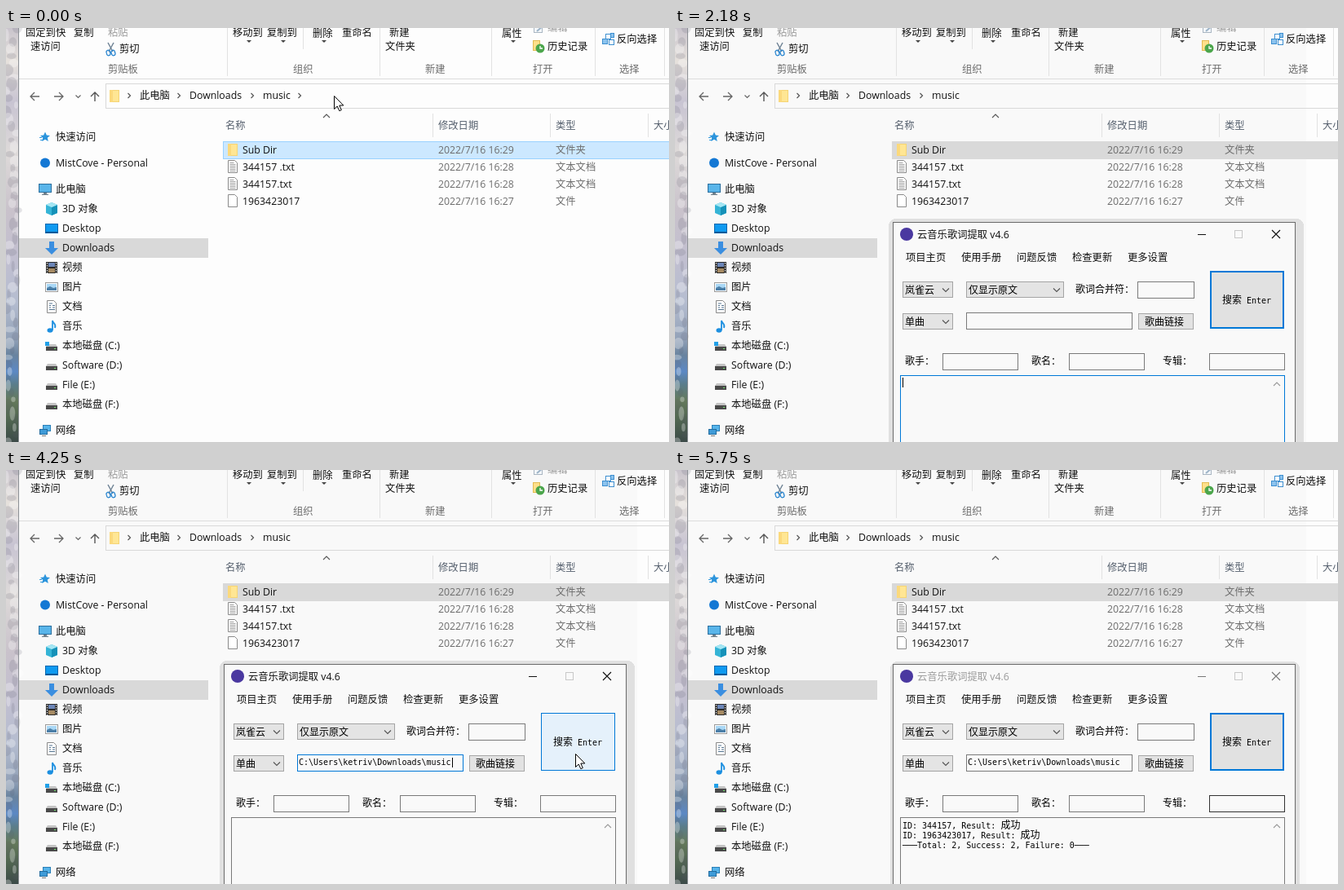
Recreate the animation shown at these times as an HTML page. Size 813x508 px, loop 5.77 s.

```html
<!DOCTYPE html>
<html lang="zh-CN">
<head>
<meta charset="utf-8">
<title>File window and lyric tool</title>
<style>
html, body { margin: 0; width: 100%; height: 100%; overflow: hidden; background: #fdfdfd; }
svg { display: block; width: 813px; height: 508px; }
text { font: 12.3px "Open Sans", "Noto Sans CJK SC", "Noto Sans CJK", sans-serif; fill: #111; white-space: pre; }
.dim { fill: #6d6d6d; }
.head { fill: #56606e; }
.off { fill: #9b9b9b; }
.white { fill: #fff; }
.form { font-size: 12px; fill: #000; }
.mono { font: 10px "DejaVu Sans Mono", monospace; }
rect { shape-rendering: crispEdges; }
</style>
</head>
<body>
<svg id="stage" viewBox="0 0 813 508"></svg>
<script>
const LOOP = 5770;
const BLUE = '#0078d7';
const PAPER = '#fdfdfd', SHADE = '#f9f9f9';
const PATH = 'C:\\Users\\ketriv\\Downloads\\music';

// Drawing helpers: each returns SVG markup
const rect = (x, y, w, h, fill, stroke, sw = 1) => stroke
  ? `<rect x="${x + sw / 2}" y="${y + sw / 2}" width="${w - sw}" height="${h - sw}" fill="${fill}" stroke="${stroke}" stroke-width="${sw}"/>`
  : `<rect x="${x}" y="${y}" width="${w}" height="${h}" fill="${fill}"/>`;
const path = (d, stroke, sw = 1, fill = 'none') =>
  `<path d="${d}" fill="${fill}" stroke="${stroke}" stroke-width="${sw}"/>`;
const disc = (x, y, r, fill) => `<circle cx="${x}" cy="${y}" r="${r}" fill="${fill}"/>`;
const text = (x, mid, str, cls = '') => `<text x="${x}" y="${Math.round(mid + 4.6)}" class="${cls}">${str}</text>`;
const form = (x, mid, str) =>
  text(x, mid - .3, str.replace(/[ -~─]+/g, '<tspan class="mono">$&</tspan>'), 'form');
const move = (x, y, body) => `<g transform="translate(${x} ${y})">${body}</g>`;
const during = (spans, body) => `<g data-on="${spans}">${body}</g>`;
const vline = (x, y, h, color = '#e2e2e2') => rect(x, y, 1, h, color);
const chevron = (x, y, dx, dy, color = '#555') => dx
  ? path(`M${x - 1.5} ${y - 3}l3 3l-3 3`, color, 1.2)
  : path(`M${x - 4} ${y - dy * 2}l4 ${dy * 4}l4 ${-dy * 4}`, color, 1.1);
const dropMark = x => path(`M${x - 3} 15h6l-3 3z`, 'none', 0, '#444');

// Icons, centred on the origin
const folder = rect(-6, -7, 12, 15, '#ffe694', '#f5d475') + rect(-6, -7, 4, 15, '#fbd97c');
const sheet = path('M-5.5 -7.5h8l3 3v12h-11z', '#8a8a8a', 1, '#fff');
const textFile = sheet + path('M-3.5 -4.5h5M-3.5 -2.5h7M-3.5 -.5h7M-3.5 1.5h7M-3.5 3.5h7M-3.5 5.5h7', '#8a8a8a', .8);
const drive = path('M-7 0l2 -3h10l2 3z', 'none', 0, '#c4c4c4') + rect(-7, 0, 14, 5, '#4a4a4a') + rect(3, 2, 2, 1, '#6fe06a');
const screen = rect(-8, -7, 16, 11, '#59b5ea', '#2c6f9e') + rect(-2, 4, 4, 2, '#71818c') + rect(-4, 6, 8, 1, '#71818c');
const star = path('M0 -6L1.8 -2L6 -1.6L2.8 1.2L3.8 5.5L0 3.2L-3.8 5.5L-2.8 1.2L-6 -1.6L-1.8 -2z', 'none', 0, '#2b94dc') + path('M-7 1h3M-6 4h3', '#2b94dc');
const cube = path('M0 -8L7 -5V5L0 8L-7 5V-5z', 'none', 0, '#35b4d6') + path('M0 -2L7 -5V5L0 8z', 'none', 0, '#1591b8') + path('M0 -8L7 -5L0 -2L-7 -5z', 'none', 0, '#a5e6f3');
const desk = rect(-8, -6, 16, 12, '#0f9af0', '#0865ad') + rect(-7, 4, 14, 1, '#0a4f86');
const down = path('M-3 -8H3V0H8L0 8L-8 0H-3z', 'none', 0, '#3a8ee0');
const film = rect(-7, -7, 14, 14, '#2b2b2b') + rect(-4, -6, 8, 5, '#6c86b8') + rect(-4, 1, 8, 5, '#a58a63')
  + path('M-5.5 -6v13M5.5 -6v13', '#eee', 1.2).replace('<path', '<path stroke-dasharray="1.5 1.5"');
const picture = rect(-8, -6, 16, 12, '#fff', '#9a9a9a') + rect(-6, -4, 12, 8, '#a9d7f5') + path('M-6 4v-3l4 -2l4 2l4 -1v4z', 'none', 0, '#4b7fa8');
const doc = sheet + path('M-3 -4h4M-3 -1.5h2M1 -1.5h3M-3 1h2M1 1h3M-3 3.5h7', '#53738f', 1.2);
const note = `<ellipse cx="-2" cy="5" rx="3.5" ry="2.8" fill="#1c8fe0"/>` + path('M1 5V-7C2 -3 6 -3 4 2', '#1c8fe0', 1.8);
const net = rect(-3, -7, 10, 8, '#56b4ea', '#2a7fb8') + rect(-7, -2, 10, 7, '#3f9bd8', '#226c9e') + rect(-4, 6, 5, 1, '#777');

const arrowCursor = '<path d="M.5 .5V16.5L4.2 13L6.8 18.7L9.3 17.6L6.8 12H11.8z" fill="#fff" stroke="#000"/>';
const beamCursor = path('M-3 -8h2l1 1l1 -1h2M0 -7v14M-3 8h2l1 -1l1 1h2', '#222');

function wallpaper() {
  const stops = [[0, '#c9c4cc'], [8, '#e6e1dc'], [18, '#c8c4d2'], [30, '#dedad9'], [44, '#c9c2cb'],
    [55, '#c2bfd0'], [66, '#b5bdd0'], [75, '#93a2b8'], [79, '#69839f'], [83, '#5c88c4'], [86, '#5b7d8c'],
    [90, '#64795b'], [95, '#4f6450'], [100, '#3c4a48']];
  const rand = n => Math.abs(Math.sin(n * 12.9898) * 43758.5453) % 1;
  const blots = Array.from({ length: 60 }, (_, i) =>
    `<ellipse cx="${rand(i + 1) * 15}" cy="${i * 8.6}" rx="${2 + rand(i + 90) * 5}" ry="${3 + rand(i + 200) * 6}"`
    + ` fill="${i % 2 ? '#fff' : '#545a68'}" opacity="${i % 2 ? .3 : .16}"/>`).join('');
  return `<defs><linearGradient id="sky" x2="0" y2="1">${stops.map(([p, c]) =>
    `<stop offset="${p}%" stop-color="${c}"/>`).join('')}</linearGradient></defs>`
    + rect(0, 0, 16, 508, 'url(#sky)') + blots + vline(15, 0, 508, '#8d9196');
}

function ribbon() {
  const labels = [[24, 5, '固定到快'], [30, 22, '速访问'], [83, 5, '复制'], [125, 5, '粘贴', 'off'], [139, 25, '剪切'],
    [278, 5, '移动到'], [320, 5, '复制到'], [376, 6, '删除'], [412, 5, '重命名'], [470, 5, '新建'], [465, 22, '文件夹'],
    [608, 6, '属性'], [664, -1, '编辑', 'off'], [664, 22, '历史记录'], [749, 13, '反向选择'],
    [125, 50, '剪贴板', 'dim'], [352, 50, '组织', 'dim'], [514, 50, '新建', 'dim'], [646, 50, '打开', 'dim'], [752, 50, '选择', 'dim']];
  const scissors = path('M125 18L131 29M132 18L126 29', '#6b7f92', 1.4)
    + path('M123.5 31a2.3 2.3 0 1 0 4 -1a2.3 2.3 0 1 0 -4 1M129.5 31a2.3 2.3 0 1 0 4 -1a2.3 2.3 0 1 0 -4 1', '#2583cf', 1.3);
  const history = rect(646, 15, 9, 13, '#ffe08a', '#e3bb52') + disc(655, 25, 5.5, '#4ca64c') + path('M655 22v3h3', '#fff', 1.3);
  const invert = rect(735, 7, 7, 7, '#fff', '#3d8fd0') + rect(731, 13, 7, 7, '#8cc3ee', '#3d8fd0')
    + rect(739, 14, 7, 7, '#fff', '#3d8fd0') + rect(741, 6, 5, 6, '#8cc3ee', '#3d8fd0');
  return rect(16, 62, 797, 1, '#dcdcdc')
    + [271, 458, 595, 722, 807].map(x => vline(x, 0, 59)).join('') + vline(364, 0, 26)
    + [298, 340, 390, 622].map(dropMark).join('')
    + labels.map(l => text(...l)).join('') + scissors + history + invert
    + rect(647, -6, 11, 12, '#f4f7fa', '#a9b6c2') + path('M651 4l8 -7', '#9db4c8', 2);
}

function addressBar() {
  const nav = path('M41 84H30M35 79l-5 5l5 5M59 84H70M65 79l5 5l-5 5', '#666', 1.3)
    + path('M85.5 82.5l3 3l3 -3', '#666', 1.2) + path('M109 90V79M104 84l5 -5l5 5', '#555', 1.4);
  const crumbs = rect(122, 68, 700, 31, 'none', '#d9d9d9') + move(133, 83, folder)
    + [151, 212, 302].map(x => chevron(x, 83, 1)).join('')
    + text(164, 82.5, '此电脑') + text(225, 82.5, 'Downloads') + text(315, 82.5, 'music');
  const edit = rect(122, 68, 700, 31, PAPER) + rect(123, 68, 700, 31, PAPER, BLUE) + move(134, 83, folder)
    + rect(147, 75, 194, 18, BLUE) + vline(340, 75, 18, '#f08a30') + text(147, 83, PATH, 'white');
  return nav + crumbs + during('0-120', chevron(360, 83, 1)) + during('120-1310', edit);
}

function sidebar() {
  const top = [[133, star, '快速访问'], [165, disc(0, 0, 6, '#1478d4'), 'MistCove - Personal'], [197, screen, '此电脑'], [493, net, '网络']];
  const sub = [[cube, '3D 对象'], [desk, 'Desktop'], [down, 'Downloads'], [film, '视频'], [picture, '图片'], [doc, '文档'], [note, '音乐'],
    [drive + rect(-8, -6, 5, 5, '#22a0e8'), '本地磁盘 (C:)'], [drive, 'Software (D:)'], [drive, 'File (E:)'], [drive, '本地磁盘 (F:)']];
  return rect(16, 258, 232, 24, '#d9d9d9')
    + top.map(([y, icon, name]) => move(48, y + .5, icon) + text(61, y + .5, name)).join('')
    + sub.map(([icon, name], i) => {
      const y = 221.5 + i * 24;
      return move(56, i > 6 ? y + 1.5 : y + .5, icon) + text(69, y, name);
    }).join('');
}

function fileList() {
  const files = [[folder, 'Sub Dir', '29', '文件夹'], [textFile, '344157 .txt', '28', '文本文档'],
    [textFile, '344157.txt', '28', '文本文档'], [sheet, '1963423017', '27', '文件']];
  return [523, 667, 787].map(x => vline(x, 105, 29)).join('')
    + [[269, '名称'], [530, '修改日期'], [674, '类型'], [794, '大小']].map(([x, s]) => text(x, 119, s, 'head')).join('')
    + chevron(393, 108, 0, -1)
    + during('0-120', rect(266, 139, 560, 22, '#cce8ff', '#99d1ff'))
    + during('120-5770', rect(266, 139, 560, 22, '#d9d9d9'))
    + files.map(([icon, name, min, kind], i) => {
      const y = 149.5 + i * 21;
      return move(278, y - .5, icon) + text(290, y, name) + text(530, y, '2022/7/16 16:' + min, 'dim') + text(674, y, kind, 'dim');
    }).join('');
}

function lyricTool() {
  const GRAY = '#7a7a7a';
  const field = (x, y, w, edge = GRAY) => rect(x, y, w, 21, SHADE, edge);
  const combo = (x, y, w, s) => rect(x, y, w, 20, '#e4e4e4', '#a4a4a4') + form(x + 3, y + 11, s) + chevron(x + w - 9, y + 10.5, 0, 1);
  const halo = (x, y, w) => `<rect x="${x}" y="${y}" width="${w}" height="300" rx="9" fill="#000" opacity=".1"/>`;
  const title = (cls, color) => text(297, 253, '云音乐歌词提取 v4.6', cls)
    + rect(641, 253, 10, 1, color) + path('M732 248l10 10M742 248l-10 10', color, 1.2);
  const menu = ['项目主页', '使用手册', '问题反馈', '检查更新', '更多设置'];
  const button = (fill, sw) => rect(656, 298, 91, 71, fill, BLUE, sw);

  return during('2180-5510', halo(262, 234, 509)) + during('5510-5770', halo(264, 235, 502))
    + rect(267, 238, 494, 280, SHADE, '#6a6a6a') + disc(284, 253, 8, '#4a38a0')
    + during('2180-5510', title('', '#111')) + during('5510-5770', title('off', '#777'))
    + rect(686, 248, 10, 10, 'none', '#c8c8c8')
    + menu.map((s, i) => text(283 + i * 68, 281, s)).join('')
    + combo(279, 311, 62, '岚雀云') + combo(357, 311, 120, '仅显示原文')
    + form(491, 321, '歌词合并符：') + field(567, 311, 70)
    + combo(279, 350, 62, '单曲') + field(357, 349, 204)
    + during('2720-4520', field(357, 349, 204, BLUE))
    + rect(568, 350, 68, 20, '#e2e2e2', '#a8a8a8') + form(576, 360.5, '歌曲链接')
    + button('#e1e1e1', 2) + during('3260-3510 4250-5390', button('#e5f1fb', 1)) + form(671, 333.5, '搜索 Enter')
    + [[282, '歌手：', 328], [437, '歌名：', 483], [598, '专辑：', 655]]
      .map(([x, s, box]) => form(x, 408.5, s) + field(box, 399, 93)).join('')
    + during('5510-5770', field(655, 399, 93, '#333'))
    + rect(276, 426, 472, 100, SHADE, GRAY) + during('2180-2720', rect(276, 426, 472, 100, SHADE, BLUE))
    + chevron(738, 437, 0, -1, '#999')
    + during('2180-2600', vline(279, 429, 12, '#000'))
    + during('2720-2840 3260-3770', vline(361, 353, 12, '#000'))
    + during('3890-5770', form(359, 358, PATH))
    + during('3890-4370', vline(547, 353, 12, '#000'))
    + during('4640-5770', ['ID: 344157, Result: 成功', 'ID: 1963423017, Result: 成功',
      '───Total: 2, Success: 2, Failure: 0───'].map((s, i) => form(279, 435.5 + i * 12, s)).join(''));
}

const pointers = during('0-120', move(402, 83, arrowCursor)) + during('120-380', move(404, 84, beamCursor))
  + during('3260-3510', move(672, 350, arrowCursor)) + during('4250-5390', move(698, 348, arrowCursor));

const stage = document.getElementById('stage');
stage.innerHTML = rect(0, 0, 813, 508, PAPER) + during('2180-5770', rect(16, 0, 758, 508, SHADE))
  + wallpaper() + ribbon() + addressBar() + sidebar() + fileList()
  + during('2180-5770', lyricTool()) + pointers;

const timed = [...stage.querySelectorAll('[data-on]')].map(el => ({
  el, spans: el.dataset.on.split(' ').map(s => s.split('-').map(Number))
}));

function show(now) {
  const t = now % LOOP;
  for (const { el, spans } of timed)
    el.style.display = spans.some(([from, to]) => t >= from && t < to) ? '' : 'none';
}

const start = performance.now();
function tick() {
  show(performance.now() - start);
  requestAnimationFrame(tick);
}
tick();
</script>
</body>
</html>
```
